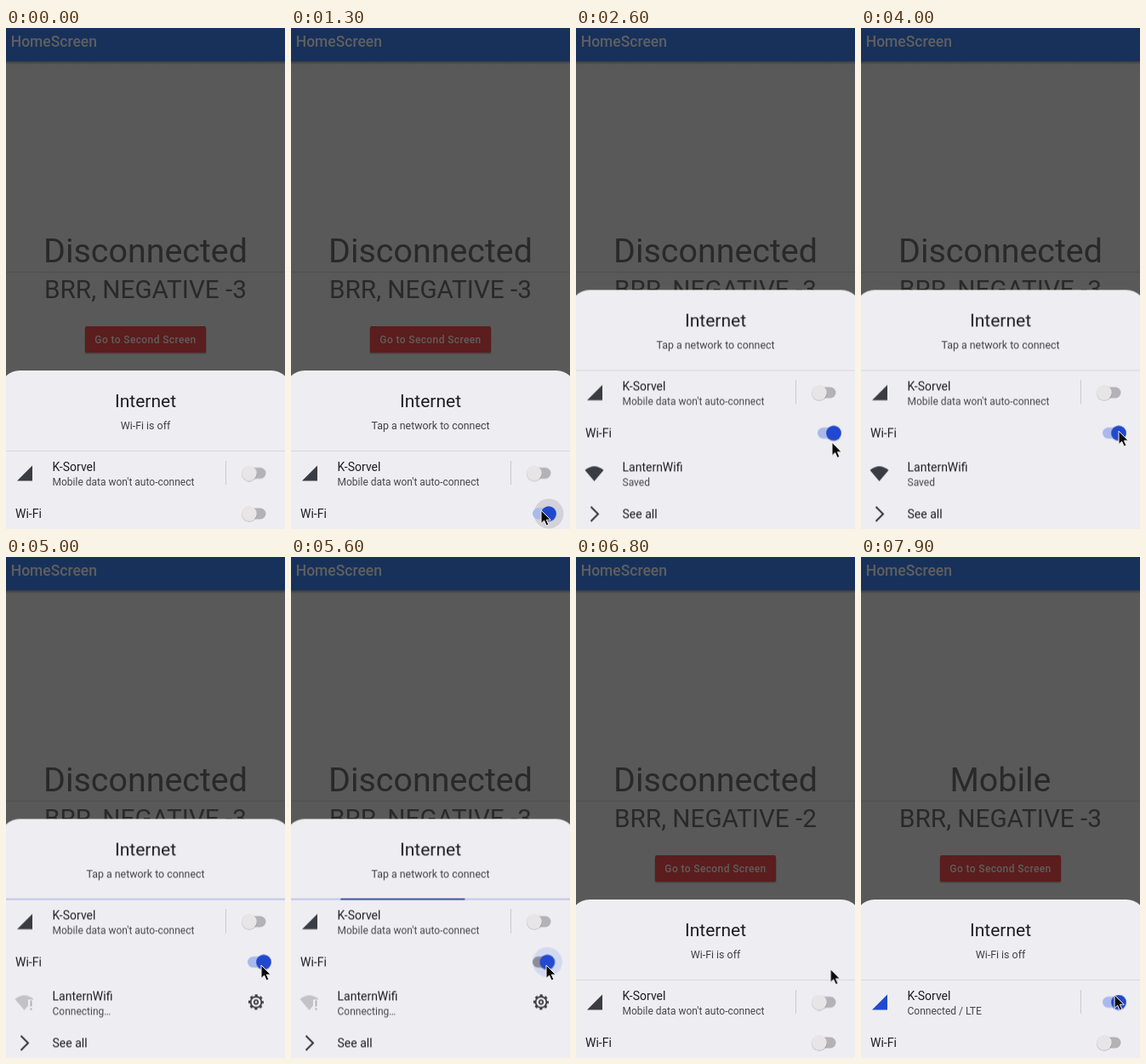
Animation, 328 px wide and 588 px high, one loop 8000 ms. Source, as an HTML page:

```html
<!DOCTYPE html>
<html lang="en">
<head>
<meta charset="utf-8">
<title>Connectivity demo</title>
<style>
html, body { margin: 0; width: 100%; height: 100%; overflow: hidden; background: #595959; }
svg { display: block; width: 100%; height: 100%; font-family: Roboto, sans-serif; }
.mid { text-anchor: middle; }
.name { font-size: 14px; fill: #1d1d22; }
.note { font-size: 12px; fill: #45464c; }
.sub { font-size: 12.4px; fill: #3f4046; text-anchor: middle; }
.headline { font-size: 39.4px; fill: #292929; text-anchor: middle; }
.count { font-size: 29.7px; fill: #292929; text-anchor: middle; }
.rule { fill: #d9d8de; }

/* Every animation shares the same 8 s clock. */
.anim { animation: 8s linear infinite; }
.cut { animation: 8s step-end infinite; }

.wifi-on { animation-name: wifi-on; }
.wifi-off { animation-name: wifi-off; }
.saved { animation-name: saved; }
.connecting { animation-name: connecting; }
.online { animation-name: online; }
.offline { animation-name: offline; }
.mobile { animation-name: mobile; }
.lte { animation-name: lte; }
.no-lte { animation-name: no-lte; }
.raised { animation-name: raised; }
.lowered { animation-name: lowered; }
@keyframes wifi-on { 0%, 71.25%, 100% { opacity: 0 } 16.25% { opacity: 1 } }
@keyframes wifi-off { 0%, 71.25%, 100% { opacity: 1 } 16.25% { opacity: 0 } }
@keyframes saved { 0%, 62.5%, 100% { opacity: 0 } 16.25% { opacity: 1 } }
@keyframes connecting { 0%, 71.25%, 100% { opacity: 0 } 62.5% { opacity: 1 } }
@keyframes online { 0%, 73.75%, 100% { opacity: 0 } 71.25% { opacity: 1 } }
@keyframes offline { 0%, 73.75% { opacity: 1 } 71.25%, 93.75%, 100% { opacity: 0 } }
@keyframes mobile { 0% { opacity: 0 } 93.75%, 100% { opacity: 1 } }
@keyframes lte { 0% { opacity: 0 } 92.5%, 100% { opacity: 1 } }
@keyframes no-lte { 0% { opacity: 1 } 92.5%, 100% { opacity: 0 } }
@keyframes raised { 0%, 93.75%, 100% { opacity: 0 } 71.25% { opacity: 1 } }
@keyframes lowered { 0%, 93.75%, 100% { opacity: 1 } 71.25% { opacity: 0 } }

.sheet { animation-name: sheet; }
@keyframes sheet {
  0%, 77.5%, 100% { transform: translateY(402px) }
  16.25% { transform: translateY(402px); animation-timing-function: cubic-bezier(.36, 0, .64, 1) }
  20.25% { transform: translateY(307.4px) }
  73.75% { transform: translateY(307.4px); animation-timing-function: cubic-bezier(.36, 0, .64, 1) }
}

.progress { animation-name: progress; }
@keyframes progress {
  0%, 62.5% { transform: translateX(-146px) }
  70% { transform: translateX(58px) }
  72.5%, 100% { transform: translateX(126px) }
}

.track { fill: #b3b2b6; }
.knob { fill: #e7e5e5; }
.ripple { fill: #d3d2d9; }
.wifi .thumb { animation-name: wifi-thumb; }
.wifi .track { animation-name: wifi-track; }
.wifi .knob { animation-name: wifi-knob; }
.wifi .ripple { animation-name: wifi-ripple; }
.data .thumb { animation-name: data-thumb; }
.data .track { animation-name: data-track; }
.data .knob { animation-name: data-knob; }
.data .ripple { animation-name: data-ripple; }
@keyframes wifi-thumb {
  0%, 14.1%, 71.5%, 100% { transform: translateX(0) }
  16%, 69.5% { transform: translateX(17px) }
  70% { transform: translateX(15.5px) }
}
@keyframes wifi-track {
  0%, 14.1%, 71.5%, 100% { fill: #b3b2b6 }
  16%, 69.5% { fill: #a9b9ea }
  70% { fill: #8b8d9a }
}
@keyframes wifi-knob {
  0%, 14.1%, 71.5%, 100% { fill: #e7e5e5 }
  16%, 70% { fill: #2148d0 }
}
@keyframes wifi-ripple {
  0%, 13.5% { opacity: 0; transform: scale(.5); fill: #d3d2d9 }
  14.5%, 16.25% { opacity: 1; transform: scale(1); fill: #d3d2d9 }
  18%, 25% { opacity: 0; transform: scale(1); fill: #d3d2d9 }
  68.5% { opacity: 0; transform: scale(.5); fill: #d2daf1 }
  69.5%, 70.2% { opacity: 1; transform: scale(1); fill: #d2daf1 }
  72%, 100% { opacity: 0; transform: scale(1); fill: #d2daf1 }
}
@keyframes data-thumb {
  0%, 90% { transform: translateX(0) }
  91.9%, 100% { transform: translateX(17px) }
}
@keyframes data-track { 0%, 90% { fill: #b3b2b6 } 91.9%, 100% { fill: #a9b9ea } }
@keyframes data-knob { 0%, 90% { fill: #e7e5e5 } 91.9%, 100% { fill: #2148d0 } }
@keyframes data-ripple {
  0%, 89% { opacity: 0; transform: scale(.5) }
  90%, 91% { opacity: 1; transform: scale(1) }
  92.5%, 100% { opacity: 0; transform: scale(1) }
}

.pointer-shown { animation-name: pointer-shown; }
@keyframes pointer-shown { 0% { opacity: 0 } 5%, 100% { opacity: 1 } }
.pointer { animation-name: pointer; }
@keyframes pointer {
  0%, 5% { transform: translate(116px, 366px) }
  9% { transform: translate(225px, 480px) }
  12.3% { transform: translate(306px, 561px) }
  14%, 24.4% { transform: translate(294px, 566px) }
  26.25% { transform: translate(295px, 525px); animation-timing-function: ease-out }
  37.5%, 50% { transform: translate(303px, 473px) }
  53.75%, 84% { transform: translate(300px, 479px); animation-timing-function: ease-in-out }
  88.75%, 91% { transform: translate(291px, 529px) }
  95% { transform: translate(290px, 519px) }
  98.75%, 100% { transform: translate(298px, 514px) }
}
</style>
</head>
<body>
<svg viewBox="0 0 328 588" preserveAspectRatio="none">
  <defs>
    <linearGradient id="shade" x2="0" y2="1">
      <stop stop-color="#3c3c3c"/>
      <stop offset="1" stop-color="#595959"/>
    </linearGradient>
    <path id="bars" d="M13 129.5 L31 111.5 V129.5 Z"/>
    <path id="fan" d="M10.5 211.5 Q21.5 202.5 32.5 211.5 L21.5 224.5 Z"/>
    <g id="gear" fill="none" stroke="#35363c">
      <circle r="6.4" stroke-width="1.7"/>
      <circle r="8" stroke-width="2" stroke-dasharray="3.14 3.143" stroke-dashoffset="1.57"/>
      <circle r="2.3" stroke-width="1.7"/>
    </g>
  </defs>

  <!-- dimmed app -->
  <rect width="328" height="588" fill="#595959"/>
  <rect y="39" width="328" height="4" fill="url(#shade)"/>
  <rect width="328" height="39" fill="#18315b"/>
  <text x="5.7" y="22" font-size="17.5" font-weight="500" fill="#5f5f5f">HomeScreen</text>
  <rect y="286" width="328" height="1" fill="#505050"/>
  <g class="headline">
    <text class="cut offline" x="164" y="275">Disconnected</text>
    <text class="cut online" x="164" y="275">Wi-Fi</text>
    <text class="cut mobile" x="164" y="275">Mobile</text>
  </g>
  <g class="count">
    <text class="cut lowered" x="164" y="317">BRR, NEGATIVE -3</text>
    <text class="cut raised" x="164" y="317">BRR, NEGATIVE -2</text>
  </g>
  <rect x="92.5" y="351.5" width="143" height="31" rx="2.5" fill="#3f3f3f" opacity=".75"/>
  <rect x="93" y="350" width="142" height="31" rx="2" fill="#5b1d1d"/>
  <text class="mid" x="164" y="370" font-size="12" font-weight="500" letter-spacing=".38" fill="#5f5f5f">Go to Second Screen</text>

  <!-- internet panel -->
  <g class="anim sheet">
    <rect x="-7" width="342" height="320" rx="23" fill="#eeedf2"/>
    <text class="mid" x="164" y="43.3" font-size="21" fill="#1d1d22">Internet</text>
    <text class="sub cut wifi-off" x="164" y="69.3">Wi-Fi is off</text>
    <text class="sub cut wifi-on" x="164" y="69.3">Tap a network to connect</text>
    <rect class="rule" y="94" width="328" height="1"/>
    <g class="cut connecting">
      <rect y="93.4" width="328" height="1.7" fill="#b8c5ea"/>
      <rect class="anim progress" y="93.4" width="146" height="1.7" fill="#2c418f"/>
    </g>

    <use class="cut no-lte" href="#bars" fill="#3a3c44"/>
    <use class="cut lte" href="#bars" fill="#2148d0"/>
    <text class="name" x="54.5" y="118">K-Sorvel</text>
    <text class="note cut no-lte" x="54.5" y="135">Mobile data won't auto-connect</text>
    <text class="note cut lte" x="54.5" y="135">Connected / LTE</text>
    <rect x="258" y="106" width="1" height="28" fill="#cbcad0"/>
    <g class="data" transform="translate(286 120.5)">
      <g class="thumb anim"><circle class="ripple anim" r="17.5"/></g>
      <rect class="track anim" x="-2" y="-6.5" width="21.5" height="13" rx="6.5"/>
      <g class="thumb anim">
        <circle cy=".8" r="9.2" fill="#000" opacity=".16"/>
        <circle class="knob anim" r="8.8"/>
      </g>
    </g>

    <text class="name" x="11" y="173">Wi-Fi</text>
    <g class="wifi" transform="translate(286 168)">
      <g class="thumb anim"><circle class="ripple anim" r="17.5"/></g>
      <rect class="track anim" x="-2" y="-6.5" width="21.5" height="13" rx="6.5"/>
      <g class="thumb anim">
        <circle cy=".8" r="9.2" fill="#000" opacity=".16"/>
        <circle class="knob anim" r="8.8"/>
      </g>
    </g>
    <rect class="rule cut wifi-off" y="189" width="328" height="1"/>

    <g class="cut wifi-on">
      <text class="name" x="54.5" y="212.6">LanternWifi</text>
      <text class="name" x="54.5" y="268">See all</text>
      <path d="M17.5 254.5 L26 263 L17.5 271.5" fill="none" stroke="#35363c" stroke-width="2"/>
    </g>
    <g class="cut saved">
      <use href="#fan" fill="#3a3c44"/>
      <text class="note" x="54.5" y="229.6">Saved</text>
    </g>
    <g class="cut connecting">
      <use href="#fan" fill="#c3c2c7"/>
      <path d="M26 212 H33 V226 H26 Z" fill="#eeedf2"/>
      <path d="M29.5 213 V220 M29.5 222 V224.3" stroke="#b3b2b8" stroke-width="2"/>
      <text class="note" x="54.5" y="229.6">Connecting…</text>
      <use href="#gear" x="294" y="215"/>
    </g>
  </g>

  <g class="cut pointer-shown">
    <path class="anim pointer" d="M0 0 V15.5 L3.6 12.2 L6.2 18 L8.9 16.8 L6.4 11.2 H11.2 Z" fill="#0c0c0c" stroke="#f4f4f4" stroke-width="1" stroke-linejoin="round"/>
  </g>
</svg>
</body>
</html>
```
